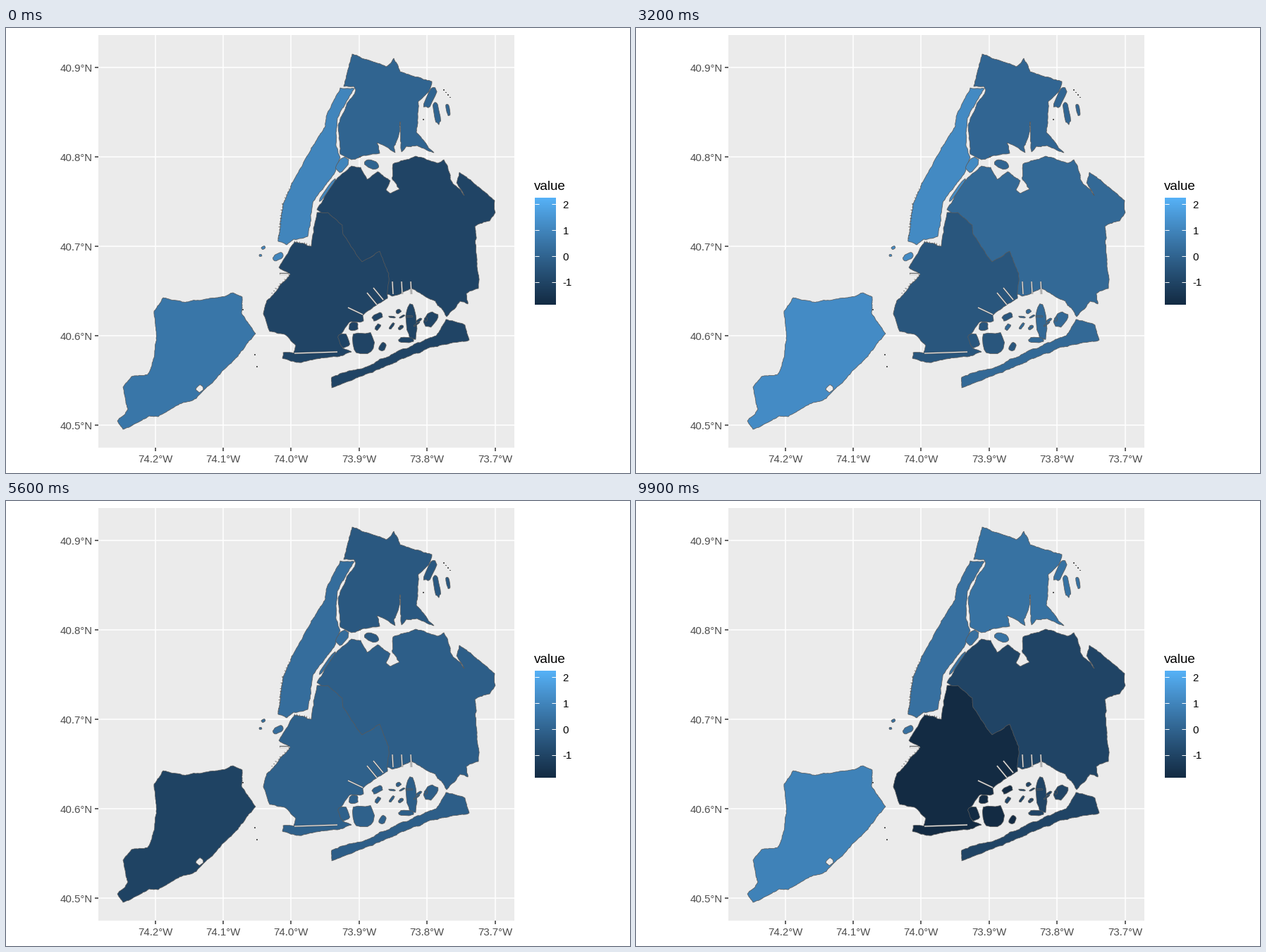
Recreate the animation shown at these times as a matplotlib script. Size 885x632 px, loop 10 s.

```python
import numpy as np
import matplotlib.pyplot as plt
from matplotlib.animation import FuncAnimation
from matplotlib.patches import Polygon, Rectangle

W, H, DPI = 885, 632, 100
PT = 72 / DPI
PANEL, EDGE = "#EBEBEB", "#595959"
LEFT, RIGHT, TOP, BOTTOM = 131, 720.5, 9.5, 596
FRAMES, STEP = 100, 100
V_MIN, V_MAX = -1.86, 2.24

plt.rcParams["font.family"] = "Liberation Sans"
rng = np.random.default_rng(4)

# fill value of each district at evenly spread key frames
KEYS = np.linspace(0, FRAMES - 1, 5).round()
VALUES = {
    "queens": [-1.00, 0.25, -0.10, -0.45, -1.00],
    "brooklyn": [-1.00, -0.62, 0.05, -0.55, -1.86],
    "bronx": [0.00, 0.40, -0.85, 1.07, 0.42],
    "manhattan": [1.00, 1.52, 0.15, 0.70, 0.38],
    "staten": [0.55, 2.24, -1.55, 0.40, 0.90],
}


def shade(value):
    """Dark-to-light blue ramp, slightly bowed as in Lab space."""
    t = np.clip((value - V_MIN) / (V_MAX - V_MIN), 0, 1)
    low, high = np.array([19, 43, 67]), np.array([86, 177, 247])
    bow = np.array([-1, -4, -5]) * 4 * t * (1 - t)
    return np.clip((low + (high - low) * t + bow) / 255, 0, 1)


# ---- coast shapes: key points, roughened by rule ----
def split(a, b):
    """Points from a up to b by midpoint displacement."""
    size = np.hypot(*(b - a))
    if size < 3:
        return [a]
    mid = (a + b) / 2 + rng.normal(0, min(0.05 * size, 0.55), 2)
    return split(a, mid) + split(mid, b)


def coast(points):
    pts = np.array(points, float)
    out = []
    for a, b in zip(pts, np.roll(pts, -1, axis=0)):
        out += split(a, b)
    return np.array(out)


def isle(x, y, length, width, tilt=0):
    """Rounded block with a ragged rim."""
    t = np.linspace(0, 2 * np.pi, 14, endpoint=False)
    c, s = np.cos(t), np.sin(t)
    grow = rng.uniform(0.85, 1.08, t.size)
    u = np.sign(c) * np.abs(c) ** 0.7 * length / 2 * grow
    v = np.sign(s) * np.abs(s) ** 0.7 * width / 2 * grow
    a = np.radians(tilt)
    return np.column_stack([x + u * np.cos(a) - v * np.sin(a),
                            y + u * np.sin(a) + v * np.cos(a)])


def bay_specks(count):
    """Small marsh islands scattered over the bay."""
    for _ in range(count):
        a, r = rng.uniform(0, 2 * np.pi), rng.uniform(0.3, 1)
        yield isle(562 + 42 * r * np.cos(a), 416 + 19 * r * np.sin(a),
                   rng.uniform(4, 11), rng.uniform(2, 6),
                   rng.uniform(-60, 10))


staten = [
    (210, 402), (223, 383), (258, 389), (305, 382), (322, 376), (335, 382),
    (334, 405), (354, 434), (327, 468), (284, 511), (270, 526), (246, 534),
    (216, 552), (203, 551), (166, 570), (158, 558), (173, 541), (166, 510),
    (178, 495), (201, 492), (209, 470), (213, 440),
]
manhattan = [
    (474, 85), (494, 86), (487, 97), (470, 128), (468, 167), (474, 184),
    (466, 206), (436, 246), (428, 296), (408, 300), (398, 308), (386, 303),
    (393, 250), (411, 211), (453, 139), (457, 118),
]
bronx = [
    (491, 37), (539, 55), (550, 43), (559, 62), (604, 76), (600, 90),
    (585, 104), (582, 148), (607, 177), (583, 167), (568, 168), (561, 176),
    (559, 133), (557, 152), (550, 169), (552, 177), (526, 163), (530, 178),
    (508, 181), (490, 187), (474, 179), (471, 138), (483, 108), (496, 88),
    (493, 83), (479, 83),
]
# shared land border, north-west to south-east
border = [(441, 262), (456, 262), (477, 280), (478, 293), (505, 332),
          (530, 317), (543, 349), (541, 375)]
queens = [
    (441, 258), (465, 218), (490, 196), (503, 198), (512, 215), (527, 204),
    (545, 217), (539, 230), (545, 235), (558, 229), (548, 215), (549, 193),
    (581, 182), (612, 192), (621, 187), (630, 214), (650, 238), (639, 220),
    (643, 205), (693, 245), (694, 262), (686, 274), (665, 282), (670, 370),
    (653, 377), (655, 392), (644, 388), (625, 410), (609, 388), (576, 370),
    (548, 381),
] + [(x - 3, y + 3) for x, y in border[:0:-1]]
rockaway = [
    (462, 511), (462, 496), (486, 487), (512, 481), (562, 456), (610, 437),
    (624, 414), (651, 422), (657, 443), (605, 453), (508, 493),
]
brooklyn = border + [
    (541, 384), (526, 393), (506, 408), (507, 416), (489, 417), (471, 439),
    (478, 455), (490, 460), (470, 467), (412, 475), (392, 469), (393, 461),
    (408, 462), (411, 451), (395, 435), (374, 431), (365, 406), (370, 387),
    (403, 350), (387, 340), (409, 304), (433, 310), (436, 284),
]

OUTLINES = {
    "queens": [coast(queens), coast(rockaway),
               isle(575, 418, 54, 14, 85), isle(602, 414, 24, 16, -55),
               isle(568, 443, 22, 8), *bay_specks(11)],
    "brooklyn": [coast(brooklyn), isle(506, 448, 32, 32, -5),
                 isle(479, 444, 20, 14, 70), isle(493, 424, 13, 12),
                 isle(527, 410, 16, 9, -30), isle(534, 453, 13, 9, -60)],
    "bronx": [coast(bronx), isle(602, 99, 32, 11, -65),
              isle(611, 121, 32, 8, 80), isle(627, 116, 18, 5, 80),
              isle(519, 194, 21, 11, 20)],
    "manhattan": [coast(manhattan), isle(477, 194, 25, 13, -55),
                  isle(455, 231, 40, 4, -55), isle(386, 325, 15, 9, -30),
                  isle(365, 312, 6, 4, -30), isle(361, 323, 4, 3)],
    "staten": [coast(staten)],
}

# ---- stage ----
fig = plt.figure(figsize=(W / DPI, H / DPI), dpi=DPI, facecolor="white")
ax = fig.add_axes([0, 0, 1, 1])
ax.axis("off")


def line(points, color, width, z=1):
    x, y = zip(*points)
    ax.plot(x, y, color=color, lw=width * PT, zorder=z,
            solid_capstyle="butt")


def label(x, y, text, size=15, color="#4D4D4D", ha="left"):
    ax.text(x, y, text, fontsize=size * PT, color=color, ha=ha, va="baseline")


# panel, grid and axes
ax.add_patch(Rectangle((LEFT, TOP), RIGHT - LEFT, BOTTOM - TOP,
                       fc=PANEL, ec="none", zorder=0))
for i in range(6):
    x = 211.5 + 96.4 * i
    line([(x, TOP), (x, BOTTOM)], "white", 1.5)
    line([(x, BOTTOM), (x, BOTTOM + 4.6)], "#333333", 1.5)
    label(x, 617, f"{74.2 - i / 10:.1f}°W", ha="center")
for i in range(5):
    y = 56.3 + 127 * i
    line([(LEFT, y), (RIGHT, y)], "white", 1.5)
    line([(LEFT - 4.6, y), (LEFT, y)], "#333333", 1.5)
    label(122.5, y + 5.5, f"{40.9 - i / 10:.1f}°N", ha="right")

# legend
ramp = shade(np.linspace(V_MAX, V_MIN, 152)[:, None, None])
ax.imshow(ramp, extent=(750, 780, 393, 241), aspect="auto", zorder=1)
label(749, 229.5, "value", 18.8, "black")
for v in (2, 1, 0, -1):
    y = 324 - 36.9 * v
    line([(750, y), (756, y)], "white", 1, 2)
    line([(774, y), (780, y)], "white", 1, 2)
    label(789.5, y + 5.5, f"{v}", 15, "black")
ax.set(xlim=(0, W), ylim=(H, 0))

# ---- map ----
shapes = {}
for z, (name, outlines) in enumerate(OUTLINES.items(), 3):
    shapes[name] = [
        ax.add_patch(Polygon(p, ec=EDGE, lw=0.75 * PT, zorder=z))
        for p in outlines
    ]

# harbour cove and narrow inlets
ax.add_patch(Polygon(isle(275, 512, 11, 9, -45), fc=PANEL, ec=EDGE,
                     lw=0.75 * PT, zorder=9))
inlets = [[(485, 397), (506, 407)], [(409, 462), (470, 460)],
          [(388, 349), (402, 349)]]
inlets += [[(x, y), (x + 14, y + 17)] for x, y in ((512, 376), (521, 369))]
inlets += [[(x, 360), (x + 1, 378)] for x in (548, 561, 574)]
for path in inlets:
    line(path, EDGE, 2.4, 9)
    line(path, PANEL, 1.2, 10)


def piers(start, end, count, reach):
    """Row of short ticks standing off a shore."""
    for f in np.linspace(0, 1, count):
        p = np.array(start) + (np.array(end) - start) * f
        line([p, p + np.array(reach) * rng.uniform(0.4, 1)], EDGE, 0.8, 10)


piers((387, 298), (393, 250), 13, (-3, 0))
piers((393, 250), (406, 221), 8, (-2, -1))
piers((409, 304), (433, 309), 8, (0, -3))
piers((378, 377), (403, 351), 9, (-3, -1))

# stray rocks
for x, y in [(353, 464), (356, 481), (336, 400), (502, 183), (592, 130)]:
    ax.add_patch(Rectangle((x - 1, y - 1), 2, 2, fc=EDGE, zorder=10))
for i in range(4):
    ax.add_patch(Rectangle((620 + 3 * i, 87 + 3.5 * i), 1.5, 1.5, fc=EDGE,
                           zorder=10))


def draw(frame):
    changed = []
    for name, patches in shapes.items():
        color = shade(np.interp(frame, KEYS, VALUES[name]))
        for patch in patches:
            patch.set_facecolor(color)
        changed += patches
    return changed


anim = FuncAnimation(fig, draw, frames=FRAMES, interval=STEP,
                     init_func=lambda: draw(0), repeat=True, blit=False)
plt.show()
```
